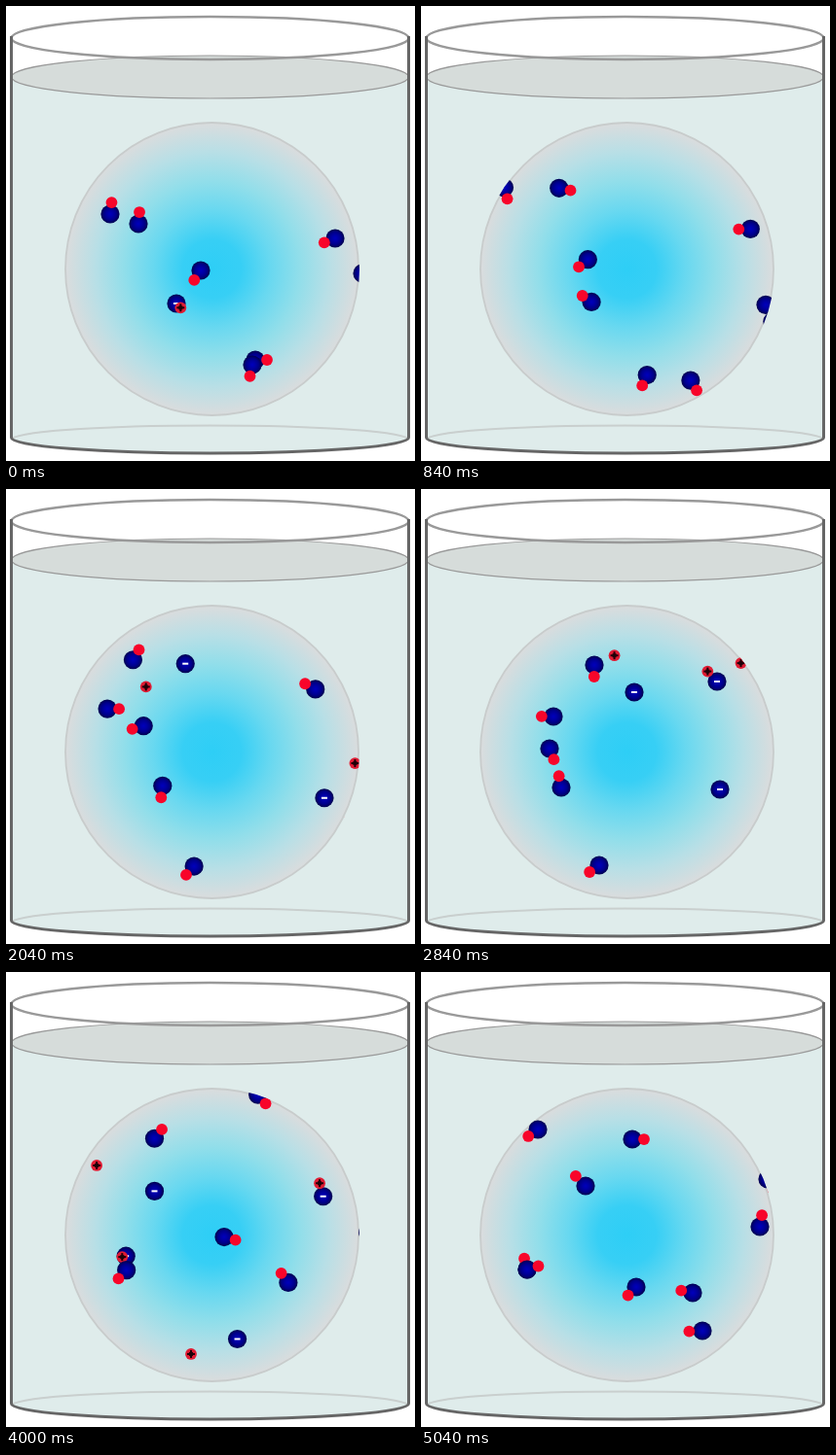
An HTML page with a canvas that plays this animation: 420 px wide and 468 px high, repeating every 5080 ms.

```html
<!DOCTYPE html>
<html>
<head>
<meta charset="utf-8">
<style>
html, body { margin: 0; width: 100%; height: 100%; overflow: hidden; background: #fff; }
canvas { display: block; }
</style>
</head>
<body>
<canvas id="stage" width="420" height="468"></canvas>
<script>
const ctx = document.getElementById('stage').getContext('2d');
const TURN = Math.PI * 2, DEG = Math.PI / 180;
const LOOP = 5.08, STEP = 0.04;
const BOND = 12, SPLIT_WIDTH = 1.2;
const TIMES = [0, 1.32, 2.84, 5.04];
const LENS = { x: 211.5, y: 270.5, r: 150.5 };

// Each molecule drifts through its key points while its bond turns steadily (degrees per second).
// A split pulls the bond open (or shut) around one moment, which charges both parts.
const molecules = [
  { path: [[107, 214], [85, 174], [178, 181], [120, 162]], angle: -83, spin: 188 },
  { path: [[40, 180], [73, 193], [132, 267], [109, 306]], angle: -173, spin: 85, split: { at: 4, by: -8 } },
  { path: [[200, 272], [155, 253], [136, 234], [169, 220]], angle: 124, spin: 20, split: { at: 4, by: 53 } },
  { path: [[136, 224], [152, 173], [219, 209], [221, 324]], angle: -85, spin: 115, split: { at: 2.4, by: 44 } },
  { path: [[175, 306], [172, 304], [144, 307], [109, 306]], angle: 45, spin: 202, split: { at: -0.1, by: -6 } },
  { path: [[256, 364], [289, 399], [305, 430], [305, 440]], angle: 0, spin: 70 },
  { path: [[253, 369], [218, 385], [183, 387], [289, 369]], angle: 102, spin: 15, split: { at: 4, by: 38 } },
  { path: [[338, 239], [335, 222], [304, 198], [348, 262]], angle: 159, spin: 24, split: { at: 3.4, by: 4 } },
  { path: [[366, 275], [344, 322], [307, 309], [279, 330]], angle: 33, spin: -40, split: { at: 2.8, by: 120 } },
  { path: [[395, 320], [348, 327], [385, 330], [356, 213]], angle: -21, spin: 88 },
  { path: [[320, 40], [320, 40], [308, 70], [217, 172]], angle: 237, spin: -47 },
];

function catmullRom(a, b, c, d, p) {
  return b + p / 2 * (c - a + p * (2 * a - 5 * b + 4 * c - d + p * (3 * (b - c) + d - a)));
}

function pointOn(path, time) {
  let i = TIMES.length - 2;
  while (TIMES[i] > time) i--;
  const p = (time - TIMES[i]) / (TIMES[i + 1] - TIMES[i]);
  const before = path[Math.max(0, i - 1)], after = path[Math.min(path.length - 1, i + 2)];
  return [0, 1].map(k => catmullRom(before[k], path[i][k], path[i + 1][k], after[k], p));
}

function splitAmount(split, time) {
  const away = Math.abs(time - split.at) / SPLIT_WIDTH;
  return away < 1 ? Math.cos(away * Math.PI / 2) ** 2 : 0;
}

function stroke(color, width) {
  ctx.strokeStyle = color;
  ctx.lineWidth = width;
  ctx.stroke();
}

function ellipse(y, ry, color, width, fill, from = 0) {
  ctx.beginPath();
  ctx.ellipse(209.5, y, 204, ry, 0, from, TURN);
  if (fill) { ctx.fillStyle = fill; ctx.fill(); }
  stroke(color, width);
}

function disc(x, y, r, fill) {
  ctx.beginPath();
  ctx.arc(x, y, r, 0, TURN);
  ctx.fillStyle = fill;
  ctx.fill();
}

function bar(x, y, w, h, fill) {
  ctx.fillStyle = fill;
  ctx.fillRect(x - w / 2, y - h / 2, w, h);
}

function radial(x, y, r, ...colors) {
  const gradient = ctx.createRadialGradient(x, y, 0, x, y, r);
  colors.forEach((color, i) => gradient.addColorStop(i / (colors.length - 1), color));
  return gradient;
}

function wall(top) {
  ctx.beginPath();
  ctx.moveTo(5.5, top);
  ctx.lineTo(5.5, 444);
  ctx.ellipse(209.5, 444, 204, 16, 0, Math.PI, 0, true);
  ctx.lineTo(413.5, top);
}

function drawBeaker() {
  wall(73);
  ctx.fillStyle = '#dfeceb';
  ctx.fill();
  ellipse(446, 14.5, '#c9cfce', 2, null, Math.PI);
  ellipse(73, 22, '#999', 1.2, '#d6dcda');
  ellipse(33, 22, '#999', 2.5);
  wall(31);
  stroke('#666', 3);
}

function drawLens() {
  const { x, y, r } = LENS;
  disc(x, y, r, radial(x, y, r, '#2ecef6', '#37cff5', '#68d8f0', '#91deea', '#b8dfe6', '#dadcdd'));
  stroke('#c8cccc', 1.8);
}

function drawMolecule({ path, angle, spin, split }, time) {
  const [x, y] = pointOn(path, time);
  const open = split ? splitAmount(split, time) : 0;
  const charged = open > 0.2;
  const gap = BOND + (split ? split.by * open : 0);
  const turn = (angle + spin * time) * DEG;
  const ionX = x + gap * Math.cos(turn), ionY = y + gap * Math.sin(turn);

  disc(x, y, 9.6, radial(x, y, 9.6, '#0000bc', '#0000a6', '#000088', '#00004c'));
  if (charged) bar(x, y, 6, 2, '#fff');
  disc(ionX, ionY, 5.9, charged ? '#e01c34' : '#f8052a');
  if (charged) {
    for (const [w, h] of [[8, 2], [2, 8], [4, 4]]) bar(ionX, ionY, w, h, '#200008');
  }
}

function draw(seconds) {
  const time = Math.floor((seconds % LOOP) / STEP) * STEP;
  ctx.clearRect(0, 0, 420, 468);
  drawBeaker();
  drawLens();
  ctx.save();
  ctx.beginPath();
  ctx.arc(LENS.x, LENS.y, LENS.r + 1, 0, TURN);
  ctx.clip();
  for (const m of molecules) drawMolecule(m, time);
  ctx.restore();
}

const start = performance.now();
function tick() {
  draw((performance.now() - start) / 1000);
  requestAnimationFrame(tick);
}
tick();
</script>
</body>
</html>
```
